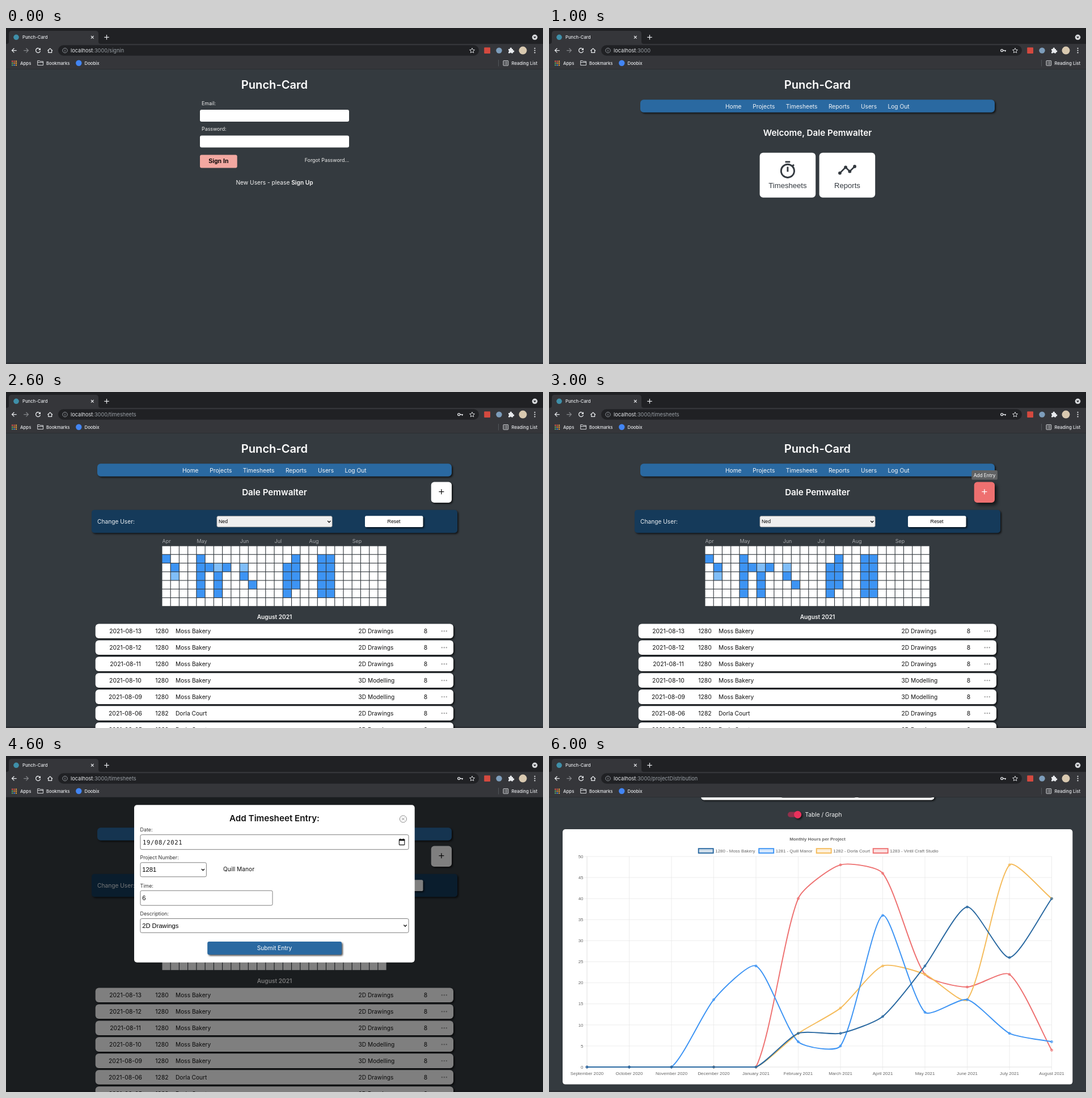
These frames come from a looping animation (947 by 592 pixels, 7 s). An HTML page:

```html
<!DOCTYPE html>
<html lang="en">
<head>
<meta charset="utf-8">
<title>Punch-Card</title>
<style>
  html, body { margin: 0; width: 100%; height: 100%; overflow: hidden; background: #343a3f; }
  svg { display: block; width: 947px; height: 592px; }
  text { font-family: Inter, sans-serif; white-space: pre; }
  .arial { font-family: "Liberation Sans", Arial, sans-serif; }
  .mono { font-family: "DejaVu Sans Mono", monospace; letter-spacing: .7px; }
  .shadow { filter: drop-shadow(2px 2px 1.6px #000a); }
  .raised { filter: drop-shadow(4px 4px 3px #000a); }
</style>
</head>
<body>
<svg id="stage" viewBox="0 0 947 592"></svg>
<script>
const BLUE = '#2a69a1', SKY = '#3d94f4', PALE = '#80bef8', RED = '#ee7070', GOLD = '#f5bb5a', INK = '#343a40';
const BODY = 10.2, SMALL = 8.9, HEAD = 15.2;
const PERSON = 'Dale Pemwalter';
const PROJECTS = { 1280: 'Moss Bakery', 1281: 'Quill Manor', 1282: 'Dorla Court', 1283: 'Vintil Craft Studio' };

// Drawing helpers, each returning SVG markup
const text = (x, y, s, size = BODY, fill = '#fff', more = '') =>
  `<text x="${x}" y="${y}" font-size="${size}" fill="${fill}" ${more}>${s}</text>`;
const mid = (x, y, s, size, fill, more = '') => text(x, y, s, size, fill, 'text-anchor="middle" ' + more);
const bold = (w = 600) => `font-weight="${w}"`;
const rect = (x, y, w, h, r, fill, more = '') =>
  `<rect x="${x}" y="${y}" width="${w}" height="${h}" rx="${r}" fill="${fill}" ${more}/>`;
const circle = (x, y, r, fill, more = '') => `<circle cx="${x}" cy="${y}" r="${r}" fill="${fill}" ${more}/>`;
const line = (d, stroke, w = 1, more = '') =>
  `<path d="${d}" fill="none" stroke="${stroke}" stroke-width="${w}" ${more}/>`;
const group = (x, y, s, scale = 1) => `<g transform="translate(${x} ${y}) scale(${scale})">${s}</g>`;
const range = (n, f) => Array.from({ length: n }, (_, i) => f(i)).join('');
const each = (list, f) => list.map(f).join('');
const SHADOW = 'class="shadow"', ARIAL = 'class="arial"';

const chevron = (x, y) => line(`M${x - 2.6} ${y - 1.3}l2.6 2.6 2.6-2.6`, '#111', 1.4);
const field = (x, y, w, h) => rect(x, y, w, h, 2.5, '#fff', 'stroke="#707070" stroke-width=".9"');
const select = (x, y, w, h, value, size) =>
  field(x, y, w, h) + text(x + 3.3, y + h / 2 + size * .35, value, size, '#000', ARIAL) + chevron(x + w - 6, y + h / 2);

function browser() {
  const icon = '#e8eaed', dim = '#85878b';
  const appColors = ['#e0594b', '#e0594b', '#e8a33d', '#59a869', '#e8823d', '#e8a33d', '#59a869', '#4a8df0', '#e8a33d'];
  return rect(0, 0, 947, 29, 0, '#202124') + rect(0, 28, 947, 44.5, 0, '#35363a') + rect(0, 72, 947, .8, 0, '#2a2c30')
    + `<path d="M1 28q4 0 4-4V10q0-5 5-5h148q5 0 5 5v14q0 4 4 4z" fill="#35363a"/>`
    + circle(18, 16.3, 4.8, '#3f8fa9')
    + text(29, 19, 'Punch-Card', 7.7, icon, bold(500))
    + line('M150 14l4.6 4.6M154.6 14l-4.6 4.6', icon, 1.1)
    + line('M173.3 16.3h8.4M177.5 12.1v8.4', icon, 1.2)
    + circle(932.5, 16.3, 4.8, '#d5d7da') + '<path d="M930 15.2h5l-2.5 3z" fill="#202124"/>'
    + line('M18.7 39.6h-8M14.4 35.8l-3.9 3.8 3.9 3.8', icon, 1.3)
    + line('M31.2 39.6h8M35.5 35.8l3.9 3.8-3.9 3.8', dim, 1.2)
    + line('M60 37.4a4 4 0 1 0 .5 3', icon, 1.3) + `<path d="M61 35v4h-4z" fill="${icon}"/>`
    + line('M73.4 40l4.3-4 4.3 4M74.8 39.2v4.1h5.8v-4.1', icon, 1.2)
    + rect(92, 30.3, 742, 18.4, 9.2, '#202124')
    + circle(104, 39.6, 4.2, 'none', `stroke="#9aa0a6" stroke-width=".9"`) + line('M104 39v2.7M104 37.2v1', '#9aa0a6')
    + line('M822 35.4l1.3 2.8 3.1.4-2.3 2.1.6 3-2.7-1.5-2.7 1.5.6-3-2.3-2.1 3.1-.4z', icon, .9)
    + rect(843.2, 34.2, 10.8, 10.8, 1, '#d4493f')
    + circle(869.5, 39.6, 5.2, '#7d9dbb')
    + `<path d="M886 37h2.6a1.8 1.8 0 1 1 3.4 0h2v2.4a1.7 1.7 0 1 1 0 3.2v2h-2.6a1.6 1.6 0 0 0-3 0H886v-2.4a1.6 1.6 0 0 0 0-3z" fill="${icon}"/>`
    + circle(911.5, 39.6, 7, '#d9c9b0')
    + each([35.8, 39.6, 43.4], y => circle(932.5, y, 1.1, icon))
    + each(appColors, (c, i) => rect(10 + i % 3 * 3.4, 57.4 + (i / 3 | 0) * 3.4, 2.3, 2.3, .4, c))
    + text(25, 64.8, 'Apps', 7.8, icon, bold(500))
    + line('M55.7 65.6v-8h3.6l1.2 1.3h5v6.7zM55.7 60.6h9.8', icon, .9)
    + text(71, 64.8, 'Bookmarks', 7.7, icon, bold(500))
    + circle(128.3, 61.8, 5.2, '#4285f4')
    + text(138.5, 64.8, 'Doobix', 7.8, icon, bold(500))
    + rect(868.3, 56, .7, 11.5, 0, '#5f6368')
    + rect(877, 57.6, 8.6, 8.6, .6, 'none', `stroke="${icon}" stroke-width=".9"`)
    + line('M878.4 59.8h1M880.3 59.8h3.8M878.4 61.9h1M880.3 61.9h3.8M878.4 64h1M880.3 64h3.8', icon, .8)
    + text(891.5, 64.8, 'Reading List', 7.8, icon, bold(500));
}

const address = path => `<text x="114" y="42.8" font-size="9.2" fill="#9aa0a6"><tspan fill="#e8eaed">localhost</tspan>:3000${path}</text>`;
const keyIcon = () => circle(798.7, 39.6, 2, 'none', 'stroke="#e8eaed" stroke-width="1.3"')
  + line('M800.7 39.6h5.2M804.6 39.6v2.2', '#e8eaed', 1.4);
const title = () => mid(473.5, 107, 'Punch-Card', 20.1, '#fff', bold());

function signIn() {
  return title()
    + text(345, 135.5, 'Email:', SMALL, '#eee') + rect(342, 144, 263, 21, 3, '#fff')
    + text(345, 181, 'Password:', SMALL, '#eee') + rect(342, 189.5, 263, 21, 3, '#fff')
    + rect(342, 223.5, 65.7, 23, 3, '#f3a8a1') + mid(374.8, 238.3, 'Sign In', 10.6, '#000', ARIAL + bold(700))
    + text(605, 236, 'Forgot Password...', SMALL, '#eee', 'text-anchor="end"')
    + mid(473.5, 276.2, `New Users - please <tspan ${bold()}>Sign Up</tspan>`, BODY, '#f4f4f4');
}

function nav() {
  const items = [[325.3, 'Home'], [378.8, 'Projects'], [445.6, 'Timesheets'], [511.6, 'Reports'], [564, 'Users'], [616.5, 'Log Out']];
  return title() + rect(161, 126.3, 625, 22.5, 6, BLUE, SHADOW)
    + each(items, ([x, s]) => mid(x, 141.6, s, BODY, '#f4f6f8'));
}

function home() {
  const timer = circle(12, 13, 8, 'none', `stroke="${INK}" stroke-width="2"`)
    + line('M9 2h6M12 8v6M18 7l1.6-1.6', INK, 2);
  const trend = line('M3 16l7-7 5 5 6-6', INK, 1.8)
    + each([[3, 16], [10, 9], [15, 14], [21, 8]], ([x, y]) => circle(x, y, 2, INK));
  return nav() + mid(473.5, 190, 'Welcome, ' + PERSON, HEAD, '#fff', bold())
    + rect(371.6, 219.7, 98.6, 79, 6, '#fff') + rect(476.6, 219.7, 98.6, 79, 6, '#fff')
    + group(403.5, 233, timer, 1.45) + group(508.6, 232.4, trend, 1.45)
    + mid(420.9, 281.5, 'Timesheets', 13.1, INK, ARIAL) + mid(525.9, 281.5, 'Reports', 13.1, INK, ARIAL);
}

function timesheets(hover) {
  const months = { Apr: 0, May: 4, Jun: 9, Jul: 13, Aug: 17, Sep: 22 };
  const hours = ['', '1...1..........1..11', '.1..1121.2....11..11', '.2..1.1..1....11..11',
    '....1.1...1...11..11', '....1.1.......1...11', ''];
  const pitch = 15.24, left = 275.5;
  const entries = ['13', '12', '11', '10', '09', '06', '05'];
  const plus = hover ? '#fff' : '#111';
  return nav() + mid(473.5, 182.4, PERSON, HEAD, '#fff', bold())
    + rect(749.7, 158.6, 36.3, 36.3, 5.5, hover ? RED : '#fff', hover ? 'class="raised"' : SHADOW)
    + line('M763.4 175.7h9M767.9 171.2v9', plus, 1.3)
    + (hover ? rect(745.3, 138, 45.6, 16.6, 2.6, '#606264') + mid(768, 149.5, 'Add Entry', 8.3, '#fff') : '')
    + rect(151, 207.8, 645, 40.4, 5, '#153a5a', SHADOW)
    + text(161, 231.7, 'Change User:', BODY, '#eef1f4')
    + rect(371.8, 218.6, 203.5, 19.3, 2.6, '#efefef', 'stroke="#777" stroke-width=".7"')
    + text(375, 231.3, 'Ned', 8.77, '#000', ARIAL) + chevron(569.8, 228.4)
    + rect(633, 218.3, 102.5, 19.8, 2.6, '#fff', SHADOW) + mid(684, 231.3, 'Reset', 8.77, '#000', ARIAL)
    + each(Object.entries(months), ([m, c]) => text(left + c * pitch, 265.8, m, 9, '#a8abae'))
    + each(hours, (row, r) => range(26, c =>
        rect(left + c * pitch, 271.6 + r * pitch, 14.1, 14.1, 0, { 1: SKY, 2: PALE }[row[c]] || '#fff')))
    + mid(473.5, 400, 'August 2021', BODY, '#f4f4f4', bold())
    + each(entries, (day, i) => {
        const id = i < 5 ? 1280 : 1282;
        return group(0, 408.5 + i * 28.95,
          rect(157.7, 0, 631.3, 25.6, 6, '#fff', SHADOW)
          + mid(210.5, 16.5, '2021-08-' + day, 10.4, '#111') + mid(275, 16.5, id, 10.4, '#111')
          + text(299, 16.5, PROJECTS[id], BODY, '#111')
          + text(621.5, 16.5, i == 3 || i == 4 ? '3D Modelling' : '2D Drawings', BODY, '#111')
          + mid(740, 16.5, 8, 10.4, '#111')
          + each([768.8, 772.8, 776.8], x => circle(x, 12.8, 1.2, '#a5a5a5')));
      });
}

function entryForm() {
  const label = (y, s) => text(236.5, y, s, SMALL, '#333');
  return timesheets() + rect(0, 72, 947, 520, 0, '#000', 'opacity=".5"')
    + rect(226, 86.3, 494.7, 277.4, 5, '#fff')
    + mid(473.5, 115.2, 'Add Timesheet Entry:', HEAD, '#111', bold())
    + circle(700.4, 111, 6, 'none', 'stroke="#8a8a8a"') + line('M698 108.6l4.8 4.8M702.8 108.6l-4.8 4.8', '#8a8a8a')
    + label(132.7, 'Date:') + field(237, 138.7, 473, 26)
    + text(241, 156.3, '19/08/2021', 10.5, '#111', 'class="mono"')
    + rect(693.4, 147, 9.4, 9.6, .6, 'none', 'stroke="#111" stroke-width="1.1"')
    + rect(693, 146.6, 10.2, 2.8, 0, '#111') + line('M695.4 145.4v2M700.8 145.4v2', '#111', 1.1)
    + label(182.2, 'Project Number:') + select(237, 187.8, 116.4, 25, 1281, 11.2)
    + text(383, 202.7, PROJECTS[1281], BODY, '#111')
    + label(231.5, 'Time:') + field(237, 237.2, 233, 26) + text(240.3, 254.2, 6, 11.2, '#000', ARIAL)
    + label(280.8, 'Description:') + select(236.9, 286.5, 473.1, 24.8, '2D Drawings', 11.2)
    + rect(355.2, 327, 236.8, 23, 3, BLUE, SHADOW) + mid(473.5, 342.2, 'Submit Entry', BODY, '#fff');
}

const filterCard = () => rect(268.2, 106, 411.2, 41, 5, '#fff', SHADOW)
  + mid(338.5, 118.6, 'Filter by:', 9, '#111', bold())
  + text(409, 118.6, 'Project Status:', SMALL, '#333') + text(544, 118.6, 'Project Number:', SMALL, '#333')
  + select(409.6, 124, 131.2, 19, 'Show All', 10.5) + select(544.6, 124, 131.2, 19, 'Show All', 10.5);

function ring(x, y, r, percent, arc, track) {
  const a = percent / 50 * Math.PI;
  return circle(x, y, r, 'none', `stroke="#d5d6d7" stroke-width="${track}"`)
    + line(`M${x} ${y - r}A${r} ${r} 0 ${+(percent > 50)} 1 ${x + r * Math.sin(a)} ${y - r * Math.cos(a)}`,
      percent > 90 ? RED : PALE, arc)
    + mid(x - .4, y + 3.5, percent + '%', BODY, '#111');
}

function overview() {
  const stages = ['Coordination', 'Technical', 'Engineering', 'Construction'];
  const cards = [
    [1280, 39, [[22, 50], [88, 200], [14, 65], [32, 80]]],
    [1281, 28, [[46, 50], [46, 230], [25, 70], [13, 120]]],
    [1282, 45, []]];
  return mid(473.5, 91.5, 'Project Overview', HEAD, '#fff', bold()) + filterCard()
    + each(cards, ([id, total, parts], i) => group(0, 150.2 + i * 207.2,
        rect(268.2, 0, 411.2, 203.6, 5, '#fff', SHADOW)
        + text(278, 21.6, `${id} - ${PROJECTS[id]}`, 11.9, '#111', bold())
        + text(278, 40.8, 'Status: Current', BODY, '#111')
        + ring(627.3, 42, 29, total, 4.4, 2.6)
        + each(parts, ([used, quoted], k) => {
            const x = 320.5 + k * 102;
            return mid(x, 92.6, stages[k], BODY, '#111', bold())
              + ring(x + .6, 127.8, 23.4, Math.round(used / quoted * 100), 3.3, 1.4)
              + mid(x, 175, `${used} / ${quoted}`, BODY, '#111');
          })
        + mid(473.5, 194.6, 'Used / Quoted:', BODY, '#111', bold())));
}

// Smooth line through the points, with control points kept inside the plot
function spline(points, top, bottom, tension = .22) {
  const clamp = y => Math.min(bottom, Math.max(top, y));
  const handles = points.map(([x, y], i) => {
    const [ax, ay] = points[i - 1] || points[i], [bx, by] = points[i + 1] || points[i];
    const before = Math.hypot(x - ax, y - ay), after = Math.hypot(bx - x, by - y);
    const k = tension / (before + after);
    return [x - k * before * (bx - ax), clamp(y - k * before * (by - ay)),
            x + k * after * (bx - ax), clamp(y + k * after * (by - ay))];
  });
  return 'M' + points[0] + points.slice(1).map((p, i) =>
    `C${handles[i].slice(2)} ${handles[i + 1].slice(0, 2)} ${p}`).join('');
}

function chart() {
  const months = ['September', 'October', 'November', 'December', 'January', 'February', 'March', 'April',
    'May', 'June', 'July', 'August'];
  const series = [
    [1280, BLUE, 263, [0, 0, 0, 0, 0, 8, 8, 12, 24, 38, 26, 40]],
    [1281, SKY, 369.5, [0, 0, 0, 16, 24, 6, 5, 36, 13, 16, 8, 6]],
    [1282, GOLD, 471, [0, 0, 0, 0, 0, 8, 14, 24, 22, 16, 48, 40]],
    [1283, RED, 571, [0, 0, 0, 0, 0, 40, 48, 46, 22, 19, 22, 4]]];
  const X = i => 67 + i * 74.5, Y = v => 548 - v * 7.42;
  const label = (x, y, s, more = '') => text(x, y, s, 7.9, '#666', ARIAL + more);
  return group(0, -69.5, filterCard())
    + rect(421, 98.6, 22, 9.2, 4.6, '#92304c') + circle(438.6, 103.3, 6.6, '#ea315c', SHADOW)
    + text(451.5, 106.8, 'Table / Graph', BODY, '#f4f4f4')
    + rect(24, 129, 899.3, 449.6, 5, '#fff')
    + label(473.5, 149, 'Monthly Hours per Project', ' text-anchor="middle" ' + bold(700))
    + each(series, ([id, color, x]) =>
        rect(x + .7, 163.2, 26, 7.8, 0, color, `fill-opacity=".22" stroke="${color}" stroke-width="1.9"`)
        + label(x + 30.3, 169.8, `${id} - ${PROJECTS[id]}`))
    + range(11, i => line(`M62 ${Y(i * 5)}H${X(11)}`, i ? '#e6e6e6' : '#d4d4d4', .7)
        + label(60.5, Y(i * 5) + 2.7, i * 5, ' text-anchor="end"'))
    + range(12, i => line(`M${X(i)} 177V553`, i ? '#e6e6e6' : '#d4d4d4', .7)
        + label(X(i), 562, `${months[i]} ${i < 4 ? 2020 : 2021}`, ' text-anchor="middle"'))
    + each(series.reverse(), ([, color, , values]) => {
        const points = values.map((v, i) => [X(i), Y(v)]);
        return line(spline(points, 177, 548), color, 1.95)
          + each(points, ([x, y]) => circle(x, y, 2, color, `fill-opacity=".45" stroke="${color}" stroke-width=".8"`));
      });
}

const scenes = [
  ['/signin', signIn()], ['', home()], ['/timesheets', timesheets()], ['/timesheets', timesheets(true)],
  ['/timesheets', entryForm()], ['/projectOverview', overview()], ['/projectDistribution', chart()]];

const stage = document.getElementById('stage');
stage.innerHTML = rect(0, 0, 947, 592, 0, '#343a3f') + rect(0, 589, 947, 3, 0, '#2d3136')
  + each(scenes, ([, page]) => `<g class="scene">${page}</g>`)
  + browser()
  + each(scenes, ([path], i) => `<g class="bar">${address(path)}${i ? keyIcon() : ''}</g>`);
const pages = stage.querySelectorAll('.scene'), bars = stage.querySelectorAll('.bar');

function tick() {
  const current = Math.floor(performance.now() / 1000) % scenes.length;
  scenes.forEach((_, i) => {
    pages[i].style.display = bars[i].style.display = i === current ? '' : 'none';
  });
  requestAnimationFrame(tick);
}
tick();
</script>
</body>
</html>
```
